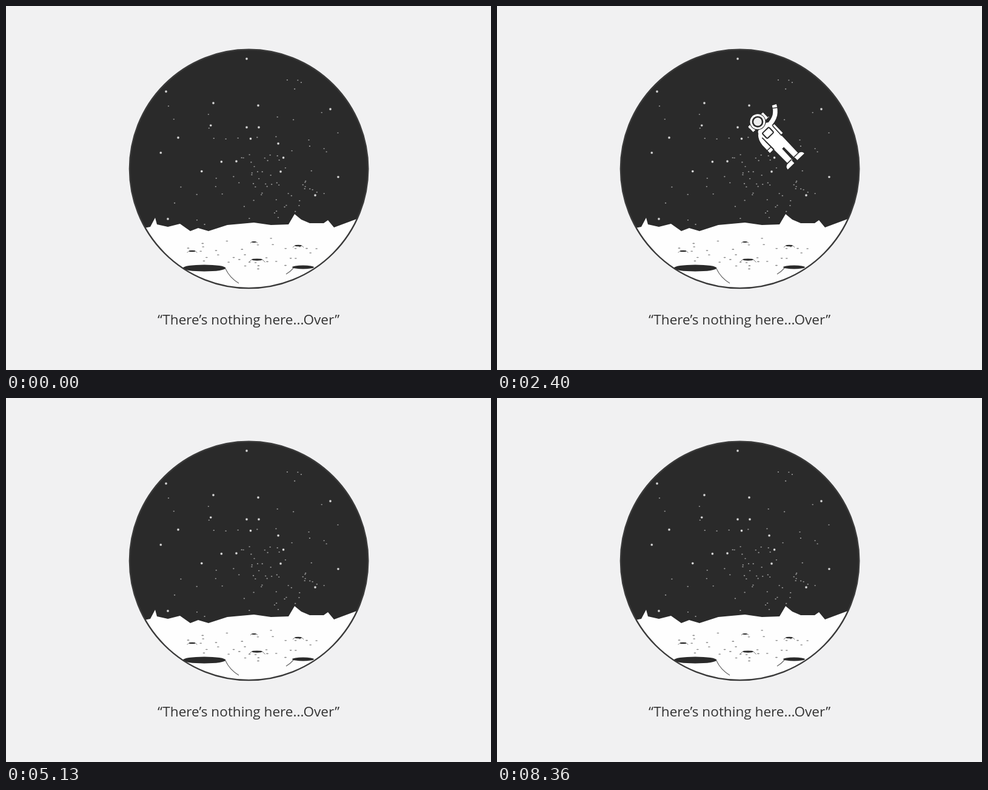
Animation, 800 px wide and 600 px high, one loop 8.63 s. Source, as an HTML page with a canvas:

```html
<!DOCTYPE html>
<html lang="en">
<head>
<meta charset="utf-8">
<style>
  html, body { margin: 0; width: 100%; height: 100%; overflow: hidden; background: #f1f1f2; }
  canvas { display: block; }
</style>
</head>
<body>
<canvas id="stage" width="800" height="600"></canvas>
<script>
const ctx = document.getElementById('stage').getContext('2d');
const LOOP = 8630, DARK = '#2a2a2a', WHITE = '#fff';
const CX = 400.6, CY = 268.4, R = 196.7;

const landmarkStars = [
  [397, 87], [264, 141], [342, 160], [416, 164], [535, 170], [397, 200],
  [417, 200], [284, 217], [380, 256], [453, 273], [510, 312], [267, 351]];
const ridge = `M228,366L238,364 246,349 249,360 267,364 287,359 304,371 317,366 334,371 365,361
  409,357 437,361 466,360 476,343 487,352 501,358 524,358 531,353 541,365 584,349V480H220Z`;

// Poses: time, x, y, degrees
const passes = [
  { scale: 1, poses: [
    [0, 140, 245, 95], [1600, 330, 228, 24], [2400, 459, 221, -44],
    [3600, 606, 209, -97], [4400, 653, 203, -112]] },
  { scale: .71, poses: [
    [5100, 629, 195, 165], [6000, 477, 232, 58], [6800, 337, 273, -139], [8360, 160, 315, -290]] }
];

function seededRandom(seed) {
  return () => (seed = seed * 16807 % 2147483647) / 2147483647;
}

// Places marks around a centre, denser towards it as focus rises.
function scatter(seed, count, cx, cy, rx, ry, focus, draw) {
  const random = seededRandom(seed);
  for (let i = 0; i < count; i++) {
    const angle = random() * Math.PI * 2, distance = random() ** focus;
    draw(cx + rx * distance * Math.cos(angle), cy + ry * distance * Math.sin(angle));
  }
}

function ellipse(x, y, rx, ry, fill) {
  ctx.beginPath();
  ctx.ellipse(x, y, rx, ry, 0, 0, Math.PI * 2);
  ctx.fillStyle = fill;
  ctx.fill();
}

function strokePath(d, color, width) {
  ctx.strokeStyle = color;
  ctx.lineWidth = width;
  ctx.stroke(new Path2D(d));
}

function fillPath(d, color) {
  ctx.fillStyle = color;
  ctx.fill(new Path2D(d));
}

function circlePath() {
  ctx.beginPath();
  ctx.arc(CX, CY, R, 0, Math.PI * 2);
}

const dimStar = (x, y) => ellipse(x, y, 1.2, .9, '#999');
const speck = (x, y) => ellipse(x, y, 2, .8, '#888');

function brightStar(x, y) {
  ellipse(x, y, 2.4, 2.4, '#8884');
  ellipse(x, y, 1.7, 1.7, '#ddd');
}

function crater(x, y, w) {
  ellipse(x, y, w, w / 8 + .5, DARK);
  strokePath(`M${x - w},${y}l${-w / 2},${w / 2}M${x + w},${y}l${w / 2},${w / 2}`, '#777', 1);
}

function drawScene() {
  ctx.fillStyle = '#f1f1f2';
  ctx.fillRect(0, 0, 800, 600);
  ctx.save();
  circlePath();
  ctx.clip();
  ctx.fillStyle = DARK;
  ctx.fillRect(200, 70, 400, 400);

  scatter(12, 38, 395, 235, 180, 135, .6, dimStar);
  scatter(77, 44, 430, 295, 85, 60, .7, dimStar);
  scatter(31, 8, 400, 250, 160, 90, .4, brightStar);
  landmarkStars.forEach(([x, y]) => brightStar(x, y));

  fillPath(ridge, '#fefefe');
  scatter(5, 34, 405, 407, 125, 28, .6, speck);
  crater(307, 404, 5.5);
  crater(409, 389, 4);
  crater(482, 395, 6);
  crater(414, 418, 9);
  ellipse(327, 432, 35.5, 5.5, DARK);
  ellipse(490, 430.5, 18, 3, DARK);
  strokePath('M362,433Q369,448 384,457M474,432Q469,438 462,442', '#666', 1.2);
  ctx.restore();

  circlePath();
  ctx.strokeStyle = '#3a3a3a';
  ctx.lineWidth = 2.4;
  ctx.stroke();

  ctx.fillStyle = '#333';
  ctx.font = '22.6px "Open Sans", sans-serif';
  ctx.textAlign = 'center';
  ctx.fillText('“There’s nothing here...Over”', 400, 525);
}

// Drawn upright around the middle of the body.
function drawAstronaut(x, y, degrees, scale) {
  ctx.save();
  ctx.beginPath();
  ctx.rect(202, 70, 395, 397);
  ctx.clip();
  ctx.translate(x, y);
  ctx.rotate(degrees * Math.PI / 180);
  ctx.scale(scale, scale);
  ctx.lineJoin = 'round';

  // Backpack and arms
  fillPath('M13,-20h4v20h-4z', WHITE);
  strokePath('M-11,-24Q-17,-18 -17.5,-8L-17.5,9', WHITE, 7.5);
  strokePath('M8,-25Q20,-25 28,-30Q35,-35 39,-43', WHITE, 7.5);
  strokePath('M-22,3h9M33,-41l7,5', DARK, 1.4);

  // Body, legs and boots
  fillPath('M-9,-31H9Q14,-29 13,-22L12,43H2.5L2,18H-2L-2.5,43H-12L-13,-22Q-14,-29 -9,-31Z', WHITE);
  strokePath('M-13,-18L-12.5,10M13,-20L12.5,2', DARK, 1.6);
  fillPath('M-4,42V49H-19Q-19,43 -12,42ZM3,42V49H19Q19,43 12,42Z', WHITE);
  strokePath('M-13,41.5H-3M2,41.5H13', DARK, 1.5);

  ctx.strokeStyle = DARK;
  ctx.lineWidth = 2;
  ctx.beginPath();
  ctx.roundRect(-8, -23, 15, 12, 2);
  ctx.stroke();

  // Helmet
  fillPath('M-17,-47h5v12h-5zM12,-47h5v12h-5z', WHITE);
  ellipse(0, -42, 13.5, 13.5, DARK);
  ellipse(0, -42, 12.5, 12.5, WHITE);
  ellipse(0, -42, 9.4, 9.4, DARK);
  ellipse(0, -42, 6.8, 6.8, '#eee');
  ctx.restore();
}

function slope(poses, i, channel) {
  const rate = k => (poses[k + 1][channel] - poses[k][channel]) / (poses[k + 1][0] - poses[k][0]);
  if (i === 0) return rate(0);
  if (i === poses.length - 1) return rate(i - 1);
  const before = poses[i][0] - poses[i - 1][0], after = poses[i + 1][0] - poses[i][0];
  return (rate(i - 1) * after + rate(i) * before) / (before + after);
}

// Smooth cubic curve through the poses.
function sample(poses, time, channel) {
  let i = 0;
  while (i < poses.length - 2 && time >= poses[i + 1][0]) i++;
  const span = poses[i + 1][0] - poses[i][0], u = (time - poses[i][0]) / span;
  const ease = u * u * (3 - 2 * u);
  return poses[i][channel] * (1 - ease) + poses[i + 1][channel] * ease
    + span * u * (1 - u) * (slope(poses, i, channel) * (1 - u) - slope(poses, i + 1, channel) * u);
}

function frame() {
  const time = performance.now() % LOOP;
  drawScene();
  for (const { scale, poses } of passes) {
    if (time < poses[0][0] || time > poses.at(-1)[0]) continue;
    drawAstronaut(...[1, 2, 3].map(channel => sample(poses, time, channel)), scale);
  }
  requestAnimationFrame(frame);
}
frame();
</script>
</body>
</html>
```
